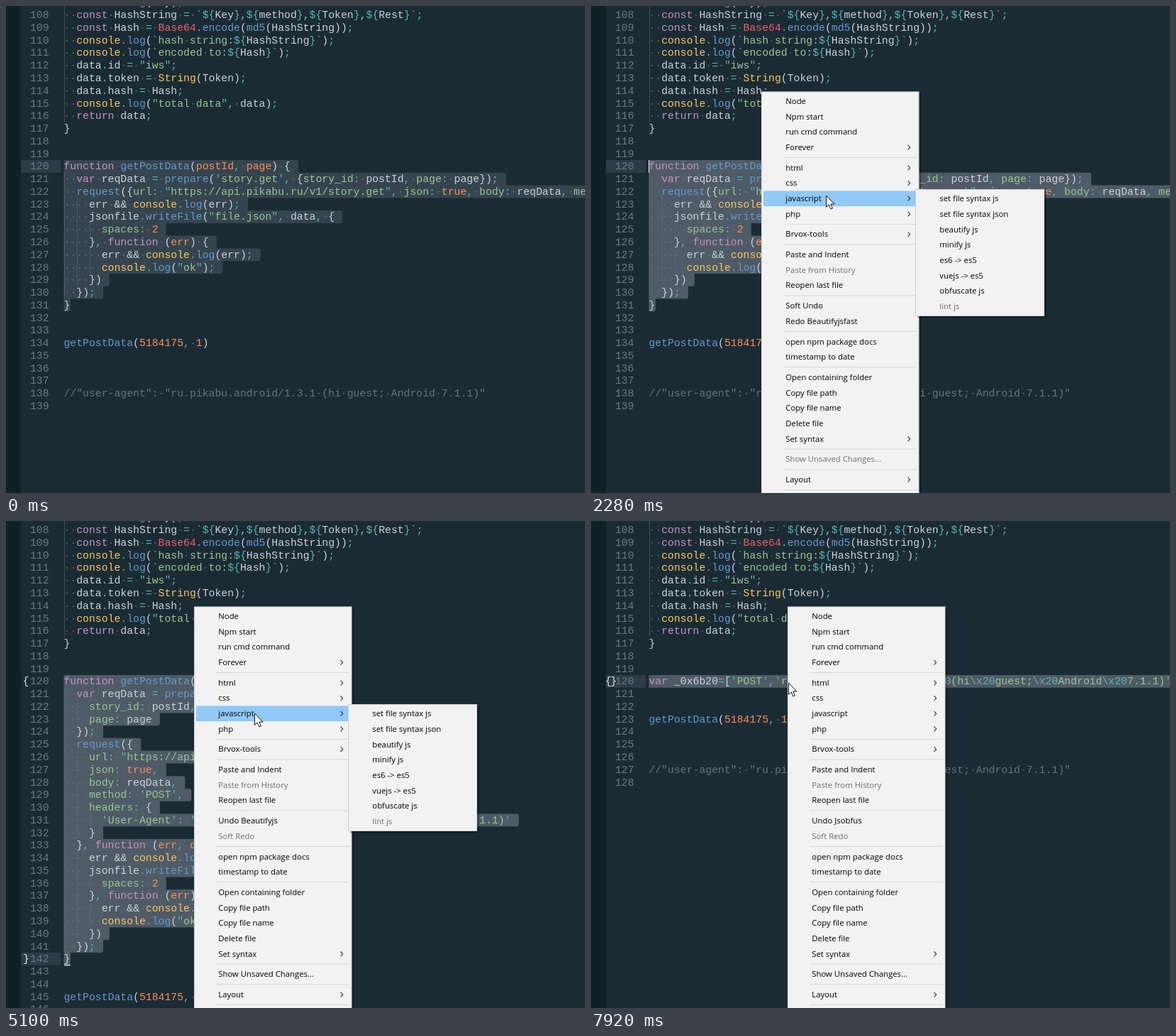
An HTML page that plays this animation: 816 by 686 pixels, repeating every 8 s.

```html
<!DOCTYPE html>
<html lang="en">
<head>
<meta charset="utf-8">
<title>Editor context menu</title>
<style>
html, body { margin: 0; width: 100%; height: 100%; overflow: hidden; background: #1b2b34; }
svg { display: block; }
.code { font: 14.79px "Liberation Mono", monospace; font-variant-ligatures: none; white-space: pre; }
.menu { font: 11.34px "Open Sans", sans-serif; }
</style>
</head>
<body>
<svg id="stage" width="816" height="686" viewBox="0 0 816 686"></svg>

<script type="text/plain" id="head">
  console.log(Key);
  const HashString = `${Key},${method},${Token},${Rest}`;
  const Hash = Base64.encode(md5(HashString));
  console.log(`hash string:${HashString}`);
  console.log(`encoded to:${Hash}`);
  data.id = "iws";
  data.token = String(Token);
  data.hash = Hash;
  console.log("total data", data);
  return data;
}


</script>
<script type="text/plain" id="compact">
function getPostData(postId, page) {
  var reqData = prepare('story.get', {story_id: postId, page: page});
  request({url: "https://api.pikabu.ru/v1/story.get", json: true, body: reqData, method: 'POST'
    err && console.log(err);
    jsonfile.writeFile("file.json", data, {
      spaces: 2
    }, function (err) {
      err && console.log(err);
      console.log("ok");
    })
  });
}
</script>
<script type="text/plain" id="pretty">
function getPostData(postId, page) {
  var reqData = prepare('story.get', {
    story_id: postId,
    page: page
  });
  request({
    url: "https://api.pikabu.ru/v1/story.get",
    json: true,
    body: reqData,
    method: 'POST',
    headers: {
      'User-Agent': 'ru.pikabu.android/1.3.1 (hi guest; Android 7.1.1)'
    }
  }, function (err, data) {
    err && console.log(err);
    jsonfile.writeFile("file.json", data, {
      spaces: 2
    }, function (err) {
      err && console.log(err);
      console.log("ok");
    })
  });
}
</script>
<script type="text/plain" id="packed">
var _0x6b20=['POST','ru.pikabu.android/1.3.1\x20(hi\x20guest;\x20Android\x207.1.1)','log'];
</script>
<script type="text/plain" id="tail">


getPostData(5184175, 1)



//"user-agent": "ru.pikabu.android/1.3.1 (hi guest; Android 7.1.1)"

</script>

<script>
const stage = document.getElementById('stage');
const CW = 8.875, LH = 17.77, X0 = 82, ITEM = 21.68, SEP = 7;
const C = { fg: '#cdd3de', teal: '#5fb3b3', green: '#99c794', blue: '#6699cc', purple: '#c594c5',
  orange: '#f99157', yellow: '#fac863', red: '#ec5f67', dim: '#65737e', sel: '#4f5b66' };

function el(parent, tag, attrs = {}, text) {
  const e = document.createElementNS('http://www.w3.org/2000/svg', tag);
  for (const k in attrs) e.setAttribute(k, attrs[k]);
  if (text !== undefined) e.textContent = text;
  return parent.appendChild(e);
}
const rect = (p, x, y, width, height, fill, more) => el(p, 'rect', { x, y, width, height, fill, ...more });
const show = (e, a) => {
  e.setAttribute('display', a > 0 ? 'inline' : 'none');
  e.setAttribute('opacity', a);
};
const rowY = n => 217 + (n - 120) * LH;
const source = id => document.getElementById(id).textContent.replace(/^\n|\n$/g, '').split('\n');

// Syntax colouring
const rules = [
  [/^\/\/.*/, C.dim],
  [/"[^"]*"|'[^']*'|`[^`]*`/, null],
  [/\b(?:const|var|function|return)\b/, C.purple],
  [/(?<=function [^{]*\()(?:\w+)|(?<=function [^{]*, )\w+/, C.orange],
  [/\b(?:true|\d+)\b/, C.orange],
  [/\bBase64\b/, C.red],
  [/\b(?:console|String)\b/, C.yellow],
  [/\w+(?=:)/, C.green],
  [/\w+(?=\()/, C.blue],
  [/\w+/, C.fg],
  [/[.;:=,]/, C.teal],
  [/[^]/, C.fg]
];
const lexer = new RegExp(rules.map(r => `(${r[0].source})`).join('|'), 'g');

function put(line, text, fill) {
  for (const part of text.split(/( +)/)) {
    if (!part) continue;
    if (part[0] === ' ') el(line, 'tspan', { fill: C.dim, 'fill-opacity': .75 }, '·'.repeat(part.length));
    else el(line, 'tspan', { fill }, part);
  }
}
function putString(line, text) {
  const quote = text[0];
  put(line, quote, C.teal);
  for (const part of text.slice(1, -1).split(/(\$\{|\}|\\x20)/)) {
    const hole = quote === '`' && /^\w+$/.test(part);
    put(line, part, /^(\$\{|\}|\\x20)$/.test(part) ? C.teal : hole ? C.fg : C.green);
  }
  put(line, quote, C.teal);
}
function codeLine(g, n, src) {
  const y = rowY(n), indent = src.search(/\S|$/);
  el(g, 'text', { x: 34, y: y + 13.4, fill: '#6b7983' }, n);
  for (let c = 0; c < indent; c += 2) {
    el(g, 'path', { d: `M${Math.round(X0 + c * CW) + .5} ${y}v${LH}`, stroke: C.dim, 'stroke-dasharray': '1 1' });
  }
  const line = el(g, 'text', { x: X0 - .5, y: y + 13.4 });
  for (const m of src.matchAll(lexer)) {
    const i = m.slice(1).findIndex(s => s !== undefined);
    rules[i][1] ? put(line, m[0], rules[i][1]) : putString(line, m[0]);
  }
}

function selection(g, lines) {
  const ends = lines.map((s, i) => X0 + s.length * CW + (i < lines.length - 1 ? 10.6 : 0));
  const d = ends.map((x, i) => {
    const y = rowY(120 + i), b = y + LH + .1, r = 3;
    const top = i && ends[i - 1] >= x ? 0 : r, bot = ends[i + 1] >= x ? 0 : r;
    return `M${X0 - .5} ${y}H${x - top}q${top} 0 ${top} ${top}V${b - bot}q0 ${bot} ${-bot} ${bot}H${X0 - .5}z`;
  });
  return el(g, 'path', { d: d.join(''), fill: C.sel });
}

rect(stage, 0, 0, 816, 686, '#1b2b34');
rect(stage, 0, 0, 21, 686, '#102027');

const head = source('head'), tail = source('tail');
const pages = ['compact', 'pretty', 'packed'].map((id, i) => {
  const g = el(stage, 'g', { class: 'code' }), body = source(id);
  rect(g, 21, rowY(i === 1 ? 142 : 120), 56, LH, '#2d3c46');
  const sel = selection(g, body);
  // two blank lines separate each block
  const rows = [...head.slice(0, 11), '', '', ...body, '', '', ...tail.filter((s, k) => s || k > 2)];
  rows.forEach((s, k) => rowY(107 + k) < 686 && codeLine(g, 107 + k, s));
  return { g, sel };
});

const mark = (x, n, s) => el(stage, 'text',
  { class: 'code', x, y: rowY(n) + 13, fill: '#e4e8ee', 'font-weight': 'bold' }, s);
const openMark = mark(23.5, 120, '{'), closeMark = mark(24, 142, '}');
const pairMark = el(stage, 'g');
pairMark.append(mark(20, 120, '{'), mark(27.5, 120, '}'));
const under = rect(stage, 82, rowY(142) + 17, 8.5, 1.4, '#e4e8ee');
const caret = rect(stage, 81, 0, 1.3, LH, '#d8dee9');

// Menus: '-' separator, '>' suffix opens a submenu, '!' prefix is disabled
function menu(x, y, w, h, pad, top, items) {
  const g = el(stage, 'g', { class: 'menu' });
  rect(g, x + 3, y + 3, w, h, '#000', { opacity: .25 });
  rect(g, x, y, w, h, '#cfcfcf');
  rect(g, x + 1, y + 1, w - 2, h - 2, '#f2f2f2');
  const hl = rect(g, x + pad, 0, w - 2 * pad, ITEM, '#91c9f7');
  let cy = top;
  const rows = [];
  for (const raw of items) {
    if (raw === '-') {
      rect(g, x + 31, cy - ITEM / 2 + 3, w - 34, 1, '#d6d6d6');
      cy += SEP;
      continue;
    }
    const label = raw.replace(/^!|>$/g, '');
    el(g, 'text', { x: x + 34.3, y: cy + 3.8, fill: raw[0] === '!' ? '#6d6d6d' : '#000' }, label);
    if (raw.endsWith('>')) {
      el(g, 'path', { d: `M${x + 206.5} ${cy - 3.3}l3.2 3.3-3.2 3.3`, fill: 'none', stroke: '#333', 'stroke-width': 1.1 });
    }
    rows.push({ label, cy });
    cy += ITEM;
  }
  const light = row => {
    show(hl, row ? 1 : 0);
    if (row) hl.setAttribute('y', row.cy - ITEM / 2);
  };
  return { x, rows, light, alpha: a => show(g, a),
    at: py => rows.find(r => Math.abs(py - r.cy) <= ITEM / 2) };
}
const mainItems = (edit, unsaved) => ['Node', 'Npm start', 'run cmd command', 'Forever>', '-',
  'html>', 'css>', 'javascript>', 'php>', '-', 'Brvox-tools>', '-',
  'Paste and Indent', '!Paste from History', 'Reopen last file', '-', ...edit, '-',
  'open npm package docs', 'timestamp to date', '-',
  'Open containing folder', 'Copy file path', 'Copy file name', 'Delete file', 'Set syntax>', '-',
  unsaved + 'Show Unsaved Changes...', '-', 'Layout>', '-'];
const subItems = ['set file syntax js', 'set file syntax json', 'beautify js', 'minify js',
  'es6 -> es5', 'vuejs -> es5', 'obfuscate js', '!lint js'];

// open/sub/close: times at which each part starts to show or is dismissed
const menus = [
  { x: 240, open: 900, sub: 1980, close: 2940, pick: 2, edit: ['Soft Undo', 'Redo Beautifyjsfast'], unsaved: '!' },
  { x: 265, open: 4020, sub: 5040, close: 6180, pick: 6, edit: ['Undo Beautifyjs', '!Soft Redo'], unsaved: '' },
  { x: 277, open: 7860, sub: 9000, close: 9000, pick: 0, edit: ['Undo Jsobfus', '!Soft Redo'], unsaved: '' }
];
for (const m of menus) {
  m.main = menu(m.x, 120.4, 222.5, 700, 3, 134.2, mainItems(m.edit, m.unsaved));
  m.subMenu = menu(m.x + 217, 258, 182, 179, 2, 271.4, subItems);
  m.ghost = el(stage, 'g', { class: 'menu' });
  const row = m.subMenu.rows[m.pick];
  rect(m.ghost, m.x + 219, row.cy - ITEM / 2, 177, ITEM, '#91c9f7');
  el(m.ghost, 'text', { x: m.x + 251.3, y: row.cy + 3.8 }, row.label);
}

// Pointer
const arrow = el(stage, 'path', { d: 'M.5 0V16.4L4.2 12.9 6.9 19 9.4 17.9 6.8 12H12Z', fill: '#fff', stroke: '#111' });
const beam = el(stage, 'path', { d: 'M-3-8h2.2l.8.8.8-.8H3M0-7.2V7.2M-3 8h2.2L0 7.2.8 8H3', fill: 'none', stroke: '#b9b2aa' });
const path = [[60, 57, 70], [840, 240, 246], [1260, 240, 246], [1740, 331, 267], [2300, 331, 267],
  [2620, 480, 273], [2880, 522, 316], [3120, 522, 316], [3720, 268, 306], [4380, 268, 306],
  [4860, 350, 271], [5160, 350, 271], [5480, 500, 275], [5820, 583, 381], [5940, 585, 402],
  [6420, 585, 402], [6960, 305, 243], [7020, 305, 243], [7200, 283, 230], [7600, 283, 230],
  [7680, 278, 228], [8000, 278, 228]];

function pointer(t) {
  const i = Math.max(1, path.findIndex(p => p[0] >= t));
  const [a, x, y] = path[i - 1], [b, u, v] = path[i];
  const k = Math.min(1, Math.max(0, (t - a) / (b - a))), e = k * k * (3 - 2 * k);
  return [x + (u - x) * e, y + (v - y) * e];
}
const fadeIn = (t, start) => t < start ? 0 : t < start + 60 ? .5 : 1;

function draw(time) {
  const t = Math.floor(time / 60) * 60;
  const page = t < 3000 ? 0 : t < 6240 ? 1 : 2;
  pages.forEach((p, i) => show(p.g, i === page ? 1 : 0));
  pages[0].sel.setAttribute('fill', t < 60 ? '#35444e' : t < 120 ? '#424f5a' : C.sel);

  const marked = page === 1 && t >= 3840;
  show(openMark, marked || (t >= 6300 && t < 6420) ? 1 : 0);
  show(closeMark, marked ? 1 : 0);
  show(pairMark, t >= 6420 ? 1 : 0);
  show(under, marked ? 1 : 0);

  const beat = page ? Math.min(t, 5940) - 4380 + 2120 : t - 900 + 1060;
  show(caret, page < 2 && t >= 60 && beat % 1060 < 530 ? 1 : 0);
  caret.setAttribute('x', page ? 90 : 81);
  caret.setAttribute('y', rowY(page ? 142 : 120));

  const [px, py] = pointer(t);
  let inMenu = false;
  for (const m of menus) {
    const live = t < m.close, on = live ? fadeIn(t, m.open) : 0, sub = live ? fadeIn(t, m.sub) : 0;
    inMenu = inMenu || on > 0;
    m.main.alpha(on);
    m.subMenu.alpha(sub);
    const inSub = sub > 0 && px > m.subMenu.x + 2;
    m.main.light(on && (sub ? m.main.rows[6] : px > m.x + 3 && m.main.at(py)));
    m.subMenu.light(inSub && m.subMenu.at(py));
    show(m.ghost, live ? 0 : Math.max(0, 1 - (t - m.close) / 300));
  }
  const at = `translate(${px.toFixed(1)} ${py.toFixed(1)})`;
  arrow.setAttribute('transform', at);
  beam.setAttribute('transform', at);
  show(arrow, inMenu ? 1 : 0);
  show(beam, !inMenu && t >= 60 ? 1 : 0);
}

const began = performance.now();
function tick() {
  draw((performance.now() - began) % 8000);
  requestAnimationFrame(tick);
}
tick();
</script>
</body>
</html>
```
